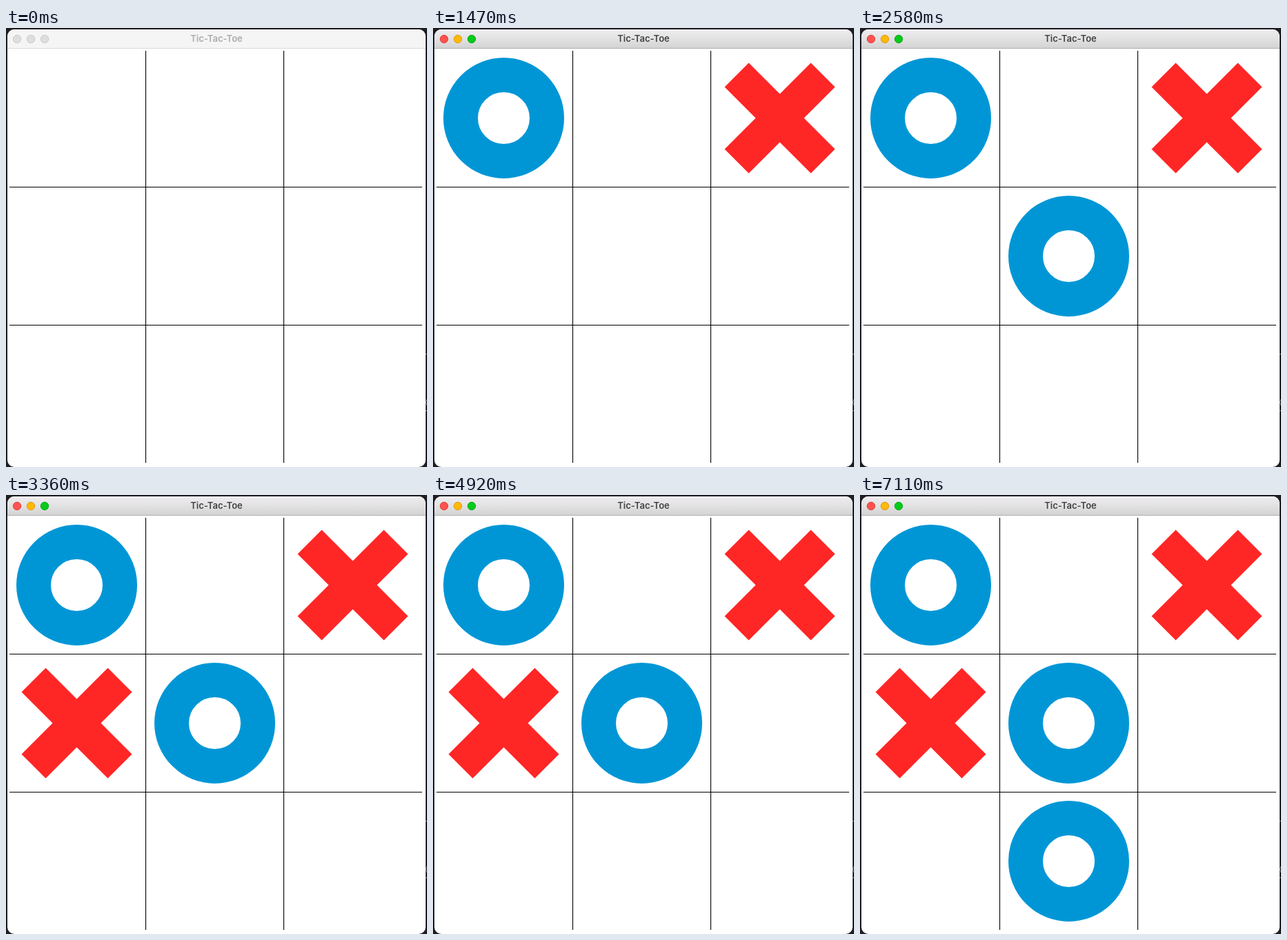
Recreate the animation shown at these times as an HTML page. Size 610 px wide and 636 px high, loop 8 s.

```html
<!DOCTYPE html>
<html lang="en">
<head>
<meta charset="utf-8">
<title>Tic-Tac-Toe</title>
<style>
  html, body { margin: 0; width: 100%; height: 100%; overflow: hidden; background: #1d1d22; }
  svg { display: block; width: 610px; height: 636px; }
  text { font: 600 13px Inter, "Open Sans", sans-serif; }
</style>
</head>
<body>
<svg viewBox="0 0 610 636">
  <defs>
    <linearGradient id="barFill" x1="0" y1="0" x2="0" y2="1">
      <stop offset="0" stop-color="#efedef"/>
      <stop offset="0.5" stop-color="#e3e2e3"/>
      <stop offset="1" stop-color="#d4d3d4"/>
    </linearGradient>
    <clipPath id="frame"><rect x="2" y="2" width="606" height="634" rx="10"/></clipPath>
    <circle id="O" r="62.5" fill="none" stroke="#0096d6" stroke-width="50"/>
    <path id="X" fill="#ff2626" d="M-80-45-45-80 0-35 45-80 80-45 35 0 80 45 45 80 0 35-45 80-80 45-35 0Z"/>
  </defs>
  <rect width="610" height="636" fill="#1d1d22"/>
  <path d="M608 472.5h2M608 554.5h2M610 538q-3 4 0 9" fill="none" stroke="#8b8b90"/>
  <g clip-path="url(#frame)">
    <rect x="2" y="2" width="606" height="634" fill="#fff"/>
    <rect id="bar" x="2" y="2" width="606" height="27"/>
    <path id="rule" d="M2 29.5H608"/>
  </g>
  <g id="lights"></g>
  <text id="title" x="305" y="20" text-anchor="middle">Tic-Tac-Toe</text>
  <path d="M202.5 33V630M402.5 33V630M5 230.5H603M5 430.5H603" stroke="#000" stroke-width="1.1"/>
  <g id="marks"></g>
  <path id="cursor" d="M.7 .9V14.6L3.9 11.6 6.3 17.2 8.9 16.1 6.5 10.6H11.6Z"
        fill="#000" stroke="#fff" stroke-linejoin="round"/>
</svg>
<script>
const LOOP = 8000, WAKE = 420;
const $ = id => document.getElementById(id);

// mark, column, row, time
const moves = [
  ['O', 0, 0, 450],
  ['X', 2, 0, 1470],
  ['O', 1, 1, 2580],
  ['X', 0, 1, 3360],
  ['O', 1, 2, 7110]
];

// from, to, x, y
const pointer = [
  [1680, 1830, 431, 123],
  [2610, 2820, 265, 341],
  [2820, 2850, 265, 343],
  [3540, 3690, 59, 378],
  [4560, 4890, 467, 545],
  [4890, 4920, 468, 545],
  [6210, 6420, 508, 516]
];

const lightColors = [['#ff5350', '#e0403c'], ['#ffb90c', '#dd9c10'], ['#06ca1c', '#0aa81a']];

function add(parent, tag, attrs) {
  const el = document.createElementNS('http://www.w3.org/2000/svg', tag);
  set(el, attrs);
  return parent.appendChild(el);
}

function set(el, attrs) {
  for (const key in attrs) el.setAttribute(key, attrs[key]);
}

function show(el, on) {
  el.style.display = on ? '' : 'none';
}

const lights = lightColors.map((_, i) =>
  add($('lights'), 'circle', { cx: 16 + 20 * i, cy: 16, r: 5.7 }));

const marks = moves.map(([kind, col, row]) =>
  add($('marks'), 'use', { href: '#' + kind, x: 102.5 + 200 * col, y: 130.5 + 200 * row }));

function draw(t) {
  const active = t >= WAKE;
  set($('bar'), { fill: active ? 'url(#barFill)' : '#f6f5f6' });
  set($('rule'), { stroke: active ? '#b3b2b3' : '#dcdbdc' });
  set($('title'), { fill: active ? '#444344' : '#acabac' });
  lights.forEach((el, i) => {
    const [fill, stroke] = active ? lightColors[i] : ['#dfdedf', '#cbcacb'];
    set(el, { fill, stroke });
  });
  marks.forEach((el, i) => show(el, t >= moves[i][3]));

  const spot = pointer.find(([from, to]) => t >= from && t < to);
  show($('cursor'), spot);
  if (spot) set($('cursor'), { transform: `translate(${spot[2]} ${spot[3]})` });
}

const start = performance.now();
function tick() {
  draw((performance.now() - start) % LOOP);
  requestAnimationFrame(tick);
}
draw(0);
requestAnimationFrame(tick);
</script>
</body>
</html>
```
